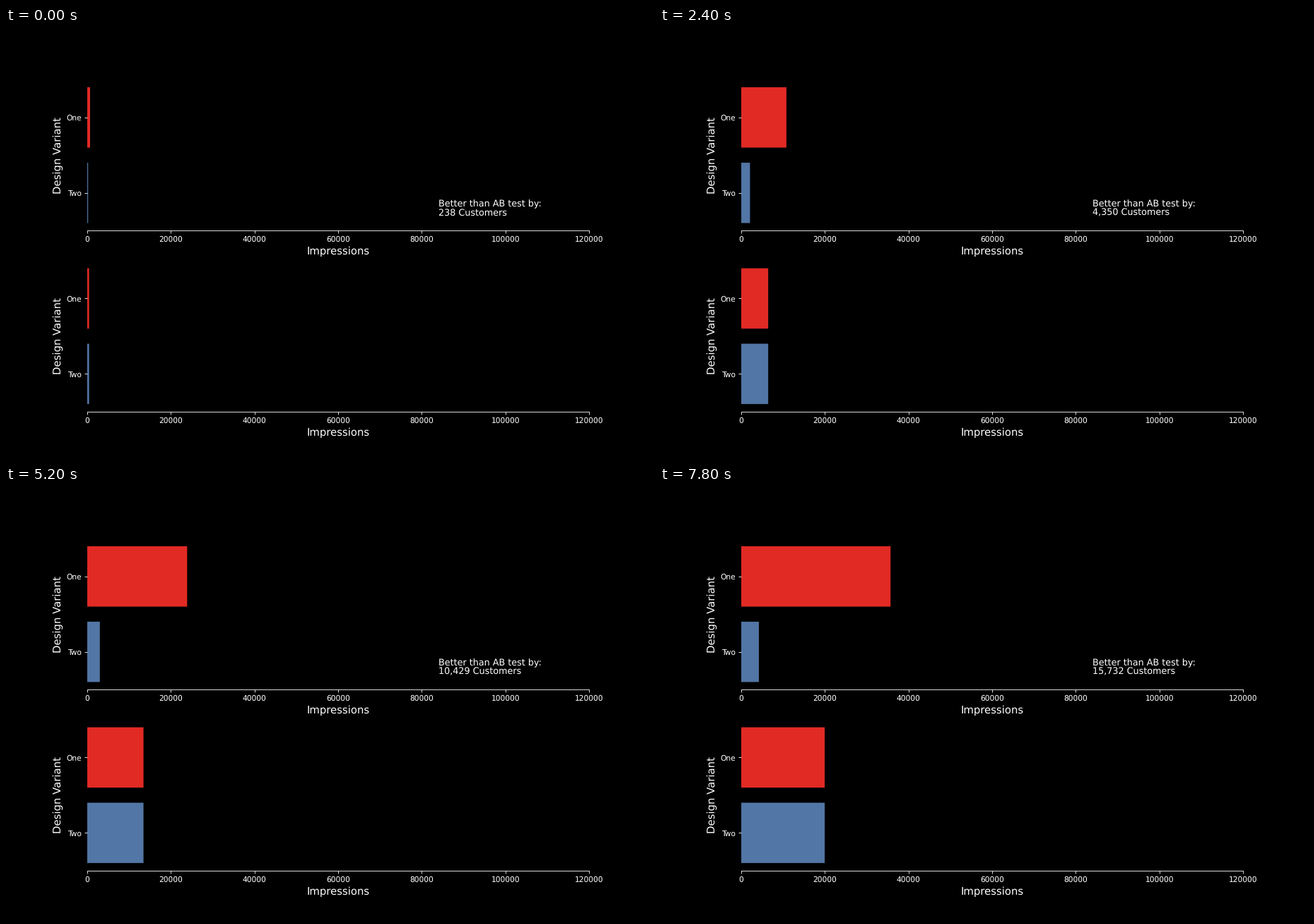
A matplotlib script that plays this animation: 917 by 611 pixels, repeating every 8000 ms.

```python
import numpy as np
import matplotlib.pyplot as plt
from matplotlib.animation import FuncAnimation

W, H, DPI = 917, 611, 76.4
FRAMES, INTERVAL = 40, 200
BATCH = 500  # impressions per variant and step in the even split
RED, BLUE = "#e12a24", "#5276a5"

# Impressions spent on the weaker variant, at a few steps
STEPS = [0, 6, 9, 12, 16, 18, 21, 26, 30, 34, 36, 39]
WEAK = [262, 1290, 1731, 2150, 2628, 2768, 2788, 3071, 3330, 3731, 3850, 4268]

plt.rcParams.update({
    "font.family": "DejaVu Sans",
    "text.hinting": "none",
    "text.color": "white",
    "axes.labelcolor": "white",
    "axes.edgecolor": "white",
    "xtick.color": "white",
    "ytick.color": "white",
})


def make_chart(ax):
    ax.set_facecolor("black")
    for side in ("left", "top", "right"):
        ax.spines[side].set_visible(False)
    bars = ax.barh([0, 1], [0, 0], height=0.8, color=[RED, BLUE],
                   linewidth=0, snap=False)
    ax.set_xlim(0, 120000)
    ax.set_ylim(1.5, -0.5)
    ax.set_yticks([0, 1], ["One", "Two"])
    ax.set_xlabel("Impressions", fontsize=14)
    ax.set_ylabel("Design Variant", fontsize=14)
    return bars


# The tiny margin keeps rounding from losing a pixel
fig, (top, bottom) = plt.subplots(
    2, 1, figsize=((W + 1e-6) / DPI, (H + 1e-6) / DPI), dpi=DPI, facecolor="black")
fig.subplots_adjust(left=0.125, right=0.9, bottom=0.11, top=0.88, hspace=0.2)

bandit_bars = make_chart(top)
even_bars = make_chart(bottom)
note = top.text(0.7, 0.1, "", fontsize=12, linespacing=1,
                transform=top.transAxes)


def update(i):
    even = BATCH * (i + 1)
    weak = int(round(np.interp(i, STEPS, WEAK)))
    gain = even - weak
    for bar, width in zip(bandit_bars, (even + gain, weak)):
        bar.set_width(width)
    for bar in even_bars:
        bar.set_width(even)
    note.set_text(f"Better than AB test by:\n{gain:,} Customers")
    return [*bandit_bars, *even_bars, note]


anim = FuncAnimation(fig, update, frames=FRAMES, interval=INTERVAL,
                     repeat=True, repeat_delay=0)
plt.show()
```
